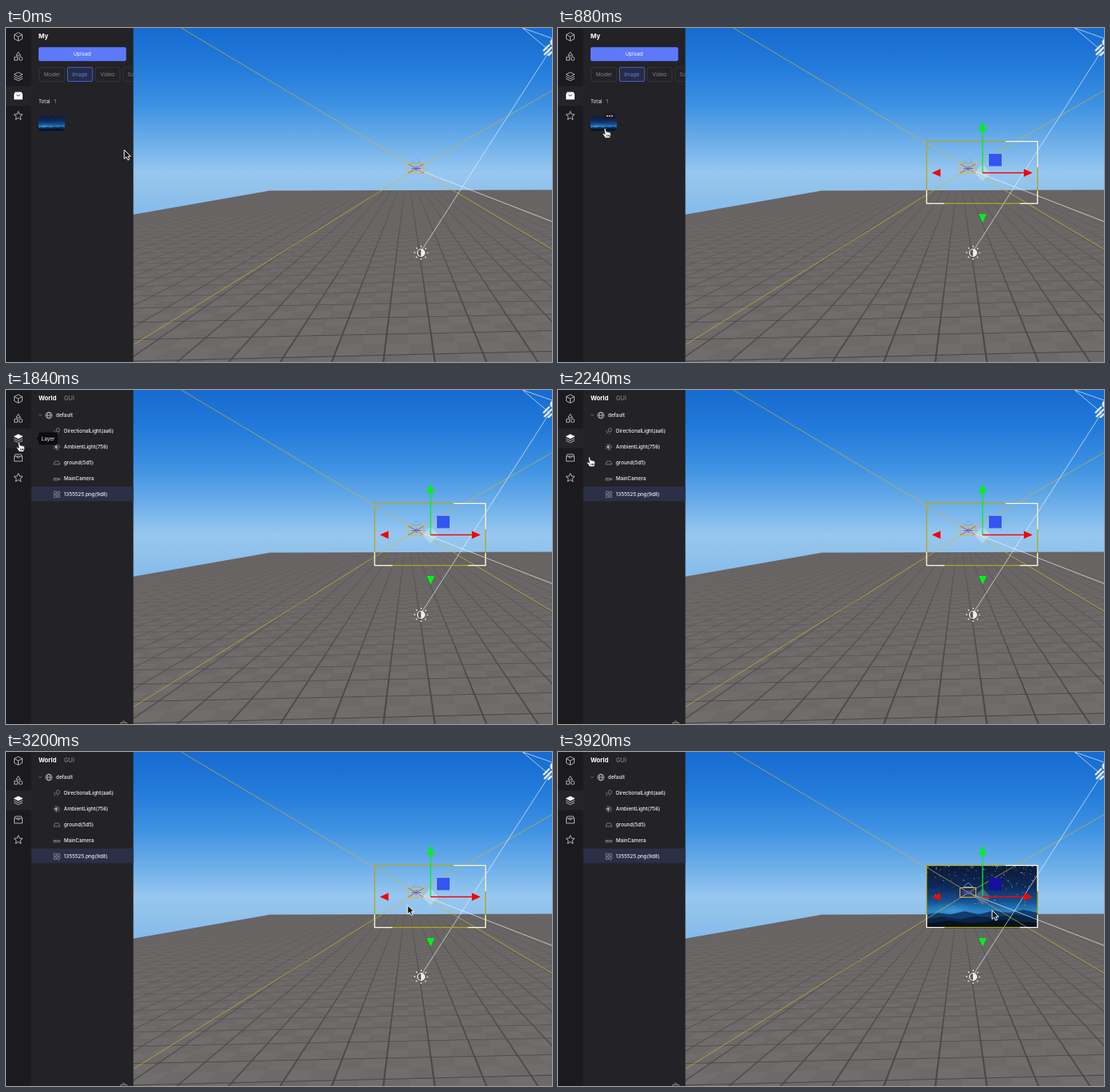
These frames come from a looping animation (688x422 px, 4000 ms). An HTML page with a canvas:

```html
<!DOCTYPE html>
<html lang="en">
<head>
<meta charset="utf-8">
<title>Scene editor</title>
<style>
html, body { margin: 0; width: 100%; height: 100%; overflow: hidden; background: #232227; }
canvas, svg { position: absolute; left: 0; top: 0; width: 688px; height: 422px; }
text { font-family: Inter, "Liberation Sans", sans-serif; font-size: 6.3px; fill: #f0f0f2; }
.ln { fill: none; stroke: #d6d6d6; stroke-width: .8; stroke-linejoin: round; }
.dim { fill: none; stroke: #98979c; stroke-width: .7; }
.ray { fill: none; stroke-width: .85; }
.tab { font-size: 6.7px; fill: #85848a; text-anchor: middle; }
#rows text { font-weight: 500; font-size: 6.25px; }
</style>
</head>
<body>
<canvas id="ground" width="688" height="422"></canvas>
<svg viewBox="0 0 688 422" xmlns="http://www.w3.org/2000/svg">
  <defs>
    <linearGradient id="night" x1="0" y1="0" x2="0" y2="1">
      <stop offset="0" stop-color="#0b1836"/><stop offset=".35" stop-color="#0e2a5a"/>
      <stop offset=".58" stop-color="#155292"/><stop offset=".74" stop-color="#2b86c8"/>
      <stop offset="1" stop-color="#0a2444"/>
    </linearGradient>
    <radialGradient id="glow">
      <stop offset="0" stop-color="#4fa9e2" stop-opacity=".6"/><stop offset="1" stop-color="#2b86c8" stop-opacity="0"/>
    </radialGradient>
    <clipPath id="panelClip"><rect width="160.500" height="422"/></clipPath>
    <g id="picture">
      <rect width="140" height="79" fill="url(#night)"/>
      <ellipse cx="34" cy="57" rx="34" ry="12" fill="url(#glow)"/>
      <g id="stars"></g>
      <path d="M0 62L14 60L30 62L48 58L66 62L84 57L104 60L122 56L140 60V79H0Z" fill="#0f3c6c"/>
      <path d="M0 67L20 65L42 68L62 64L86 66L112 62L140 66V79H0Z" fill="#0a2342"/>
      <path d="M0 73L30 70L60 73L96 69L140 73V79H0Z" fill="#06111f"/>
    </g>
    <path id="arrow" d="M0 0V11.3L2.7 8.9L4.5 12.8L6.5 11.9L4.8 8.1H8.2Z" fill="#151515" stroke="#fff" stroke-width="1"/>
    <path id="hand" d="M-1 .8C-1-.5 1-.5 1.2 .8L1.9 4.2C2.6 3.4 3.6 3.6 3.8 4.5C4.6 3.9 5.5 4.2 5.7 5C6.6 4.6 7.3 5.1 7.4 6L7.5 8.3L6.4 12H.6C-.3 10.2-1.7 8.8-2.7 7.3C-3.2 6.2-1.8 5.8-.9 6.6L.1 7.3Z M2.4 8V10.3 M4.2 8V10.3 M5.7 8V10.3" fill="#fff" stroke="#111" stroke-width=".8" stroke-linejoin="round"/>
  </defs>

  <!-- viewport -->
  <g id="shot"><use href="#picture" x="464.5" y="143.3"/></g>
  <path class="ray" stroke="#d8b62a" stroke-opacity=".8" d="M221 0L688 279.500M161 400L517 178L688 79"/>
  <path class="ray" stroke="#eef3f6" stroke-opacity=".8" d="M525 279L685 29M517 178L688 244.500M651 0L684 28M651 0L688 13"/>
  <g class="ray">
    <path d="M511 170.500L517 165L523 170.500Z" stroke="#5fb2e6"/>
    <path stroke="#e2b23c" stroke-width="1" d="M506.500 171.500H526.500V183.500H506.500Z"/>
    <path d="M507 172L517 177.500L526 172M507 183L517 177.500L526 183" stroke="#b8485c"/>
    <path d="M511 177.500H523M517 174V181" stroke="#5560a8"/>
  </g>
  <g stroke="#ededed" fill="none">
    <circle cx="523" cy="284" r="4.500" stroke-width="1.200"/>
    <path d="M523 279.500A4.500 4.500 0 0 1 523 288.500Z" fill="#ededed" stroke="none"/>
    <circle cx="523" cy="284" r="8" stroke-width="1.800" stroke-dasharray="1.400 4.883" stroke-dashoffset=".7"/>
    <path d="M677 29L685 21M678 34L688 24M683 35L688 30" stroke-width="2.400"/>
    <circle cx="691" cy="18" r="5" fill="#ededed"/>
  </g>
  <g id="guides" class="ray">
    <path d="M535.500 0V422" stroke="#c4d6df" stroke-opacity=".55"/>
    <path d="M161 183.500H688" stroke="#c9e9f2" stroke-opacity=".5"/>
    <path d="M535 183L688 234" stroke="#d8dcde" stroke-opacity=".7"/>
  </g>
  <g id="select">
    <g fill="none" stroke-width="1.300">
      <path stroke="#b4a812" d="M464.500 143.300H604.300V221.700H464.500Z"/>
      <path stroke="#f6f6ee" d="M564 143.300H604.300V176M464.500 205V221.700H487M582 221.700H604.300V206"/>
    </g>
    <path id="core" d="M535 172.500L545.500 183L535 193.500L524.500 183Z"/>
    <rect id="plane" x="543" y="159" width="16" height="15.500"/>
    <g id="axisY"><path d="M535 183V129" stroke-width="1.300"/><path d="M530 130L535 118L540 130ZM530 235H540L535 246Z" stroke="none"/></g>
    <g id="axisX"><path d="M535 183H588" stroke-width="1.300"/><path d="M587 178V188L598 183ZM482 178V188L471 183Z" stroke="none"/></g>
    <path id="coreTop" d="M535 172.500L545.500 183L535 193.500L524.500 183Z" fill="#ffff00"/>
  </g>

  <!-- side panel -->
  <g clip-path="url(#panelClip)">
    <rect width="161" height="422" fill="#232227"/>
    <rect width="31.500" height="422" fill="#1b1a1f"/>
    <rect id="active" width="32" height="25" fill="#252429"/>
    <path class="ln" d="M15.500 5.800L20.500 8.400V13.800L15.500 16.400L10.500 13.800V8.400ZM10.500 8.400L15.500 11L20.500 8.400M15.500 11V16.400"/>
    <path class="ln" d="M15.500 30.300L18.300 35H12.700ZM10.600 36.800H14.600V40.800H10.600Z"/>
    <circle class="ln" cx="18.500" cy="38.800" r="2.200"/>
    <g class="ln">
      <path id="layersTop" d="M15.500 56L21 58.700L15.500 61.400L10 58.700Z"/>
      <path d="M10 61.300L15.500 64L21 61.300M10 63.800L15.500 66.500L21 63.800"/>
    </g>
    <path id="boxIcon" class="ln" d="M10.500 83.800V90H20.500V83.800ZM10.500 83.800L11.700 81.200H19.300L20.500 83.800"/>
    <path id="boxSlot" d="M13.300 84.500Q15.500 87 17.700 84.500" fill="none" stroke-width=".9"/>
    <path id="star" class="ln"/>

    <g id="assets">
      <text x="41" y="13.200" style="font-size:8px;font-weight:700;fill:#fff">My</text>
      <rect x="41" y="24.300" width="110.500" height="17.400" rx="2" fill="#5d79fb"/>
      <text x="96" y="35.300" text-anchor="middle" style="font-size:6.500px;fill:#fff">Upload</text>
      <g fill="none" stroke="#37363c" stroke-width=".9">
        <rect x="41.500" y="49.800" width="32" height="17.600" rx="1.500"/>
        <rect x="112.500" y="49.800" width="31" height="17.600" rx="1.500"/>
        <rect x="147.500" y="49.800" width="34" height="17.600" rx="1.500"/>
        <rect x="77.500" y="49.800" width="31.500" height="17.600" rx="1.500" fill="#252c47" stroke="#4c69d8"/>
      </g>
      <text class="tab" x="57.700" y="61">Model</text>
      <text class="tab" x="93" y="61" style="fill:#5f7df7">Image</text>
      <text class="tab" x="128" y="61">Video</text>
      <text class="tab" x="153" y="61" style="text-anchor:start">Sound</text>
      <text x="41" y="94.800">Total</text>
      <text x="60.500" y="94.800" style="fill:#a5a4aa">1</text>
      <use href="#picture" transform="translate(41 111) scale(.236)"/>
      <g id="more">
        <rect x="57.500" y="107" width="15" height="8.500" rx="1.500" fill="#1d1d22"/>
        <g fill="#eee"><circle cx="62" cy="111.200" r=".9"/><circle cx="65" cy="111.200" r=".9"/><circle cx="68" cy="111.200" r=".9"/></g>
      </g>
    </g>

    <g id="layers">
      <text x="41" y="13.200" style="font-size:7.700px;font-weight:700;fill:#fff">World</text>
      <text x="73" y="13.200" style="font-size:7.400px;font-weight:600;fill:#77767c">GUI</text>
      <rect x="32" y="122" width="129" height="18.500" fill="#2b2f47"/>
      <path class="dim" d="M41.500 30.900L43.200 32.600L44.900 30.900"/>
      <g class="ln" style="stroke-width:.7"><circle cx="54" cy="32" r="4"/><ellipse cx="54" cy="32" rx="1.800" ry="4"/><path d="M50 32H58"/></g>
      <text x="63" y="34.200" style="font-weight:500">default</text>
      <g id="rows"></g>
      <g class="dim">
        <circle cx="65.500" cy="50.500" r="2.200"/><path d="M60 53L62 51M60.500 55.500L63.500 52.500M64 55.500L66 53.500"/>
        <circle cx="64" cy="72" r="2"/><path d="M64 70A2 2 0 0 0 64 74Z" fill="#ccc"/>
        <circle cx="64" cy="72" r="3.800" stroke-width="1.100" stroke-dasharray="1 1.985"/>
        <path d="M61.800 90H66.200L68 94H60Z"/>
        <path d="M60 114V111.500L63 112.500M60 114H65V111.500H61M65 112.500L68 111.500V114Z"/>
        <path d="M60.300 128.300H63.300V131.300H60.300ZM64.700 128.300H67.700V131.300H64.700ZM60.300 132.700H63.300V135.700H60.300ZM64.700 132.700H67.700V135.700H64.700Z"/>
        <path d="M144.300 422V420.500H152.300V422M145.800 420.500Q148.300 416 150.800 420.500" stroke="#aaa"/>
      </g>
      <g id="eye" class="dim"><path d="M142.800 132Q147 126.800 151.200 132Q147 137.200 142.800 132Z"/><circle cx="147" cy="132" r="1.400"/></g>
    </g>
    <g id="tip">
      <path d="M38 61.200L41.500 58.700V63.700Z" fill="#0c0c0f"/>
      <rect x="41" y="53.500" width="24" height="15.500" rx="2" fill="#0c0c0f"/>
      <text x="44.500" y="63.600" style="font-size:6.500px">Layer</text>
    </g>
  </g>
  <g id="cursor"><use id="pointer"/></g>
</svg>
<script>
const $ = id => document.getElementById(id);
const show = (id, on) => $(id).setAttribute('display', on ? 'inline' : 'none');
const set = (id, attrs) => { for (const k in attrs) $(id).setAttribute(k, attrs[k]); };

function drawWorld() {
  const W = 688, H = 422, ctx = $('ground').getContext('2d');
  const sky = ctx.createLinearGradient(0, 0, 0, 236);
  [[0, '#176bd0'], [50, '#237bda'], [100, '#4093e3'], [150, '#73b2ea'],
   [182, '#97c7f0'], [205, '#91c2ea'], [236, '#83bbee']]
    .forEach(([y, c]) => sky.addColorStop(y / 236, c));
  ctx.fillStyle = sky;
  ctx.fillRect(0, 0, W, H);

  // Perspective tiles, box-filtered so that far rows melt together.
  const vx = 505, horizon = 175, tile = .263, step = .000526, thick = .036;
  const lineSum = u => { const n = Math.floor(u); return n * thick + Math.min(u - n, thick); };
  const waveSum = u => { const f = u - Math.floor(u); return f < .5 ? f : 1 - f; };
  const mean = (sum, u, h) => (sum(u + h) - sum(u - h)) / (2 * h);
  const img = ctx.getImageData(0, 0, W, H), d = img.data;
  for (let y = 204; y < H; y++) for (let x = 160; x < W; x++) {
    const edge = x < 332 ? 205.5 + (332 - x) * .1755 : 205.5 - (x - 332) / 356;
    const cover = Math.max(0, Math.min(1, y + 1 - edge));
    if (!cover) continue;
    const Y = y + .5 - horizon;
    const u = (x - vx) / Y / tile, v = (vx + 1e4 - x) / 1e4 / Y / step;
    const hu = (1 / (Y * tile) + Math.abs(u) / Y) / 2, hv = v / Y / 2;
    const a = mean(lineSum, u + .48, hu), b = mean(lineSum, v + .02, hv);
    const line = a + b - a * b;
    const check = mean(waveSum, u + .46, hu) * mean(waveSum, v, hv);
    const base = 103 + 6 * Math.min(1, Y / 200) + check * 2.2;
    const i = (y * W + x) * 4;
    [2, -2, -2.5].forEach((tint, k) => {
      const c = (base + tint) * (1 - line) + (72 + tint / 2) * line;
      d[i + k] = d[i + k] * (1 - cover) + c * cover;
    });
  }
  ctx.putImageData(img, 0, 0);
}

function buildParts() {
  let seed = 7, stars = '';
  const rnd = () => (seed = seed * 16807 % 2147483647) / 2147483647;
  for (let i = 0; i < 170; i++) {
    const x = rnd() * 139, y = rnd() * rnd() * 58, s = .5 + rnd() * .8;
    stars += `<rect x="${x}" y="${y}" width="${s}" height="${s}" fill="${rnd() < .2 ? '#c9a58c' : '#a6cbf0'}" opacity="${.35 + rnd() * .6}"/>`;
  }
  $('stars').innerHTML = stars;
  $('rows').innerHTML = ['DirectionalLight(aa6)', 'AmbientLight(756)', 'ground(5d5)', 'MainCamera', '1355525.png(9d8)']
    .map((s, i) => `<text x="73" y="${54.2 + i * 20}">${s}</text>`).join('');
  let star = '';
  for (let i = 0; i < 10; i++) {
    const r = i % 2 ? 2.6 : 5.8, a = i * Math.PI / 5;
    star += `${i ? 'L' : 'M'}${15.5 + r * Math.sin(a)} ${111 - r * Math.cos(a)}`;
  }
  set('star', { d: star + 'Z' });
}

// time, x, y of the pointer tip
const path = [
  [0, 149, 154], [80, 147, 153], [480, 59, 127], [1040, 59, 127], [1280, 32, 96],
  [1520, 16, 66], [2080, 16, 66], [2560, 106, 139], [2800, 106, 139],
  [3280, 538, 198], [3520, 538, 198], [3760, 547, 200], [4000, 547, 200]
];
function pointerAt(t) {
  const i = path.findIndex((p, k) => k && t <= p[0]);
  const [t0, x0, y0] = path[i - 1], [t1, x1, y1] = path[i];
  const k = (t - t0) / (t1 - t0), e = k * k * (3 - 2 * k);
  return [x0 + (x1 - x0) * e, y0 + (y1 - y0) * e];
}

function render(now) {
  const t = Math.floor(now % 4000 / 80) * 80;
  const [x, y] = pointerAt(t);
  const tree = t >= 1760, placed = t >= 880, loaded = t >= 3280;
  const drag = t >= 3280 && t < 3680;
  const onThumb = !tree && x > 41 && x < 74 && y > 111 && y < 130;
  const onStrip = x < 31;
  const onRow = tree && !onStrip && x < 161 && y > 22 && y < 142;

  show('assets', !tree);
  show('layers', tree);
  show('more', onThumb);
  show('tip', onStrip && t >= 1600);
  show('eye', onRow && y > 122);
  set('active', { y: tree ? 48.5 : 73.5 });
  set('layersTop', { style: tree ? 'fill:#fff' : '' });
  set('boxIcon', { style: tree ? '' : 'fill:#fff;stroke:#fff' });
  set('boxSlot', { stroke: tree ? '#d6d6d6' : '#232227' });

  show('select', placed);
  show('shot', loaded);
  show('guides', drag);
  show('coreTop', drag);
  set('core', { fill: loaded ? '#8d8d98' : '#dceaf4', 'fill-opacity': .45 });
  set('plane', { fill: loaded ? '#1510a0' : '#3555f0' });
  const green = drag ? '#ffff00' : '#00f01c', red = drag ? '#ffff00' : '#f00808';
  set('axisY', { fill: green, stroke: green });
  set('axisX', { fill: red, stroke: red });

  set('pointer', { href: onThumb || onStrip || onRow ? '#hand' : '#arrow' });
  set('cursor', { transform: `translate(${x.toFixed(1)} ${y.toFixed(1)})` });
}

drawWorld();
buildParts();
const start = performance.now();
function loop() {
  render(performance.now() - start);
  requestAnimationFrame(loop);
}
loop();
</script>
</body>
</html>
```
